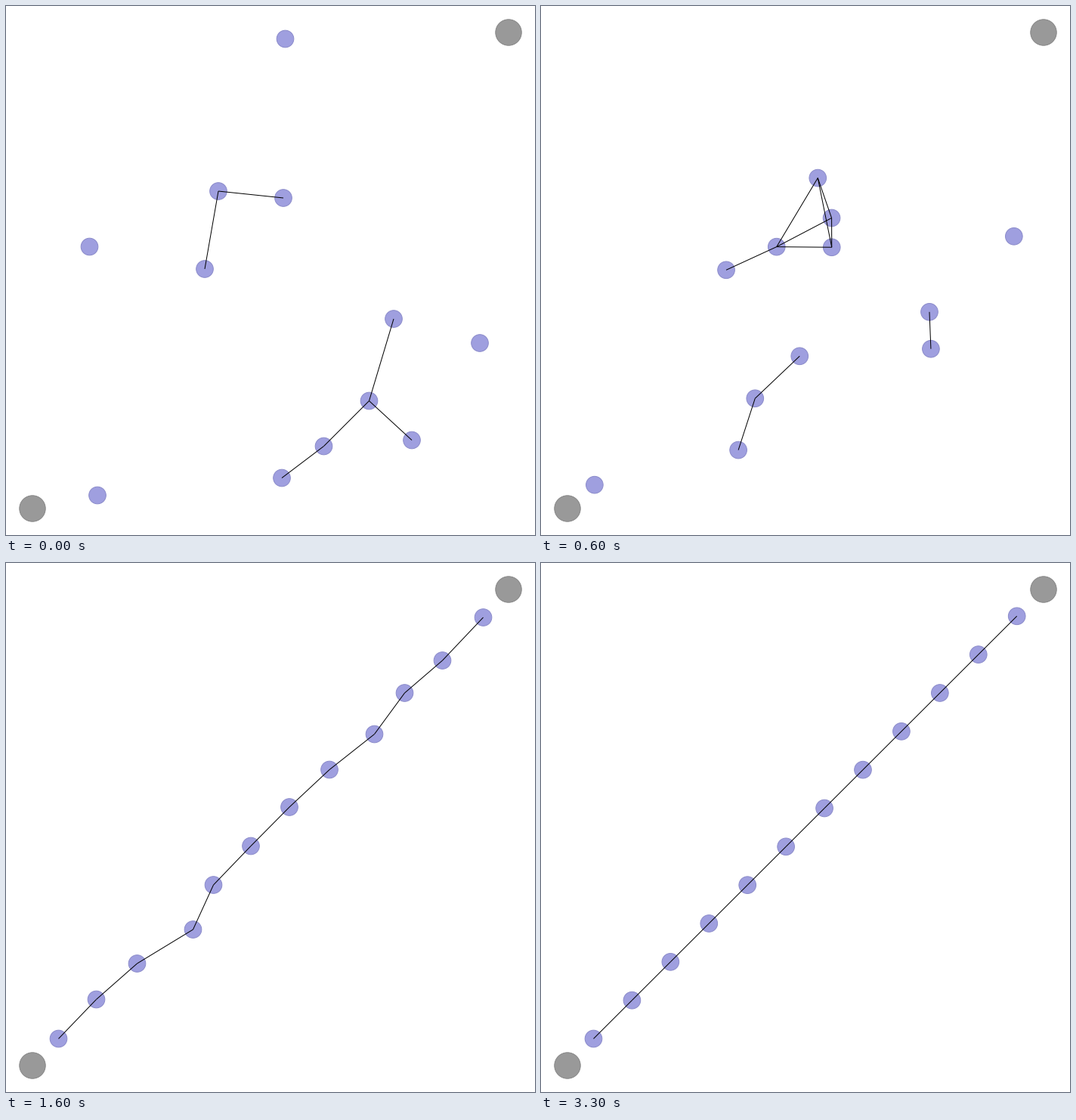
These frames come from a looping animation (700x700 px, 4.4 s). A matplotlib script:

```python
import itertools
import math

import matplotlib.pyplot as plt
import numpy as np
from matplotlib.animation import FuncAnimation
from matplotlib.collections import LineCollection
from matplotlib.patches import Circle

SIZE, DPI = 700, 100
PX = 72 / DPI              # one pixel in points
FRAMES, INTERVAL = 44, 100
SPAN = 4                   # frames between waypoints
LINK = SIZE / 6            # dots closer than this are joined
DECAY = math.log(2)

# Waypoints of each dot, ordered along the final chain (bottom left first).
PATHS = np.array([
    [(121, 647.5), (74.5, 640), (69.5, 629.5), (70, 631.5), (69.5, 629.5)],
    [(365, 624.5), (324.5, 590), (192.5, 586), (132, 582.5), (119.5, 577.5)],
    [(420.5, 582.5), (323.5, 549.5), (245, 499), (165.5, 520), (173.5, 530)],
    [(480.5, 522.5), (406.5, 468.5), (298.5, 459), (295.5, 440.5), (247.5, 485)],
    [(110.5, 318.5), (188.5, 336), (280.5, 367.5), (265.5, 430), (274.5, 426)],
    [(263, 348), (330.5, 318), (293, 320.5), (337.5, 378.5), (324, 374.5)],
    [(367, 254), (392, 319), (377, 319.5), (376, 324.5), (375, 323)],
    [(369.5, 43.5), (324, 166.5), (415.5, 265), (432, 273), (428, 273.5)],
    [(537, 574.5), (519, 505.5), (513.5, 396), (507.5, 288.5), (487.5, 226.5)],
    [(281, 245), (344, 271.5), (428, 285), (511, 213), (527.5, 172)],
    [(513, 414), (502.5, 447.5), (533.5, 333.5), (567, 218.5), (577.5, 129)],
    [(627, 446), (624, 365.5), (629.5, 238), (640.5, 119.5), (631.5, 72)],
]).swapaxes(0, 1)

GOAL = np.column_stack([np.linspace(69.5, 629.7, 12), np.linspace(629.5, 70.3, 12)])


def waypoint_slopes():
    """Slopes per segment that never overshoot a waypoint."""
    step = np.diff(PATHS, axis=0)
    a, b = step[:-1], step[1:]
    same = a * b > 0
    inner = np.where(same, 2 * a * b / np.where(same, a + b, 1), 0)
    settle = (GOAL - PATHS[-1]) * DECAY * SPAN
    return np.concatenate([step[:1], inner, settle[None]])


SLOPES = waypoint_slopes()


def dots_at(frame):
    last = (len(PATHS) - 1) * SPAN
    if frame >= last:
        return GOAL + (PATHS[-1] - GOAL) * math.exp(-DECAY * (frame - last))
    i, rest = divmod(frame, SPAN)
    t = rest / SPAN
    return ((1 + 2 * t) * (1 - t) ** 2 * PATHS[i]
            + t * (1 - t) ** 2 * SLOPES[i]
            + t * t * (3 - 2 * t) * PATHS[i + 1]
            + t * t * (t - 1) * SLOPES[i + 1])


def links(points):
    return [(p, q) for p, q in itertools.combinations(points, 2)
            if math.dist(p, q) < LINK]


fig = plt.figure(figsize=(SIZE / DPI, SIZE / DPI), dpi=DPI, facecolor="white")
ax = fig.add_axes([0, 0, 1, 1])
ax.set(xlim=(0, SIZE), ylim=(SIZE, 0))
ax.axis("off")


def add_disc(center, radius, fill, edge):
    disc = Circle(center, radius, facecolor=fill, edgecolor=edge, linewidth=PX, zorder=1)
    return ax.add_patch(disc)


for anchor in [(35, 665), (665, 35)]:
    add_disc(anchor, 17.2, "#999999", "#878787")
discs = [add_disc(p, 11.3, "#9f9fdf", "#8c8ccb") for p in PATHS[0]]
wires = ax.add_collection(
    LineCollection([], colors="black", linewidths=PX, zorder=2), autolim=False)


def draw(frame):
    points = dots_at(frame)
    for disc, p in zip(discs, points):
        disc.center = tuple(p)
    wires.set_segments(links(points))
    return [*discs, wires]


anim = FuncAnimation(fig, draw, frames=FRAMES, interval=INTERVAL,
                     init_func=lambda: draw(0), repeat=True, repeat_delay=0)
plt.show()
```
